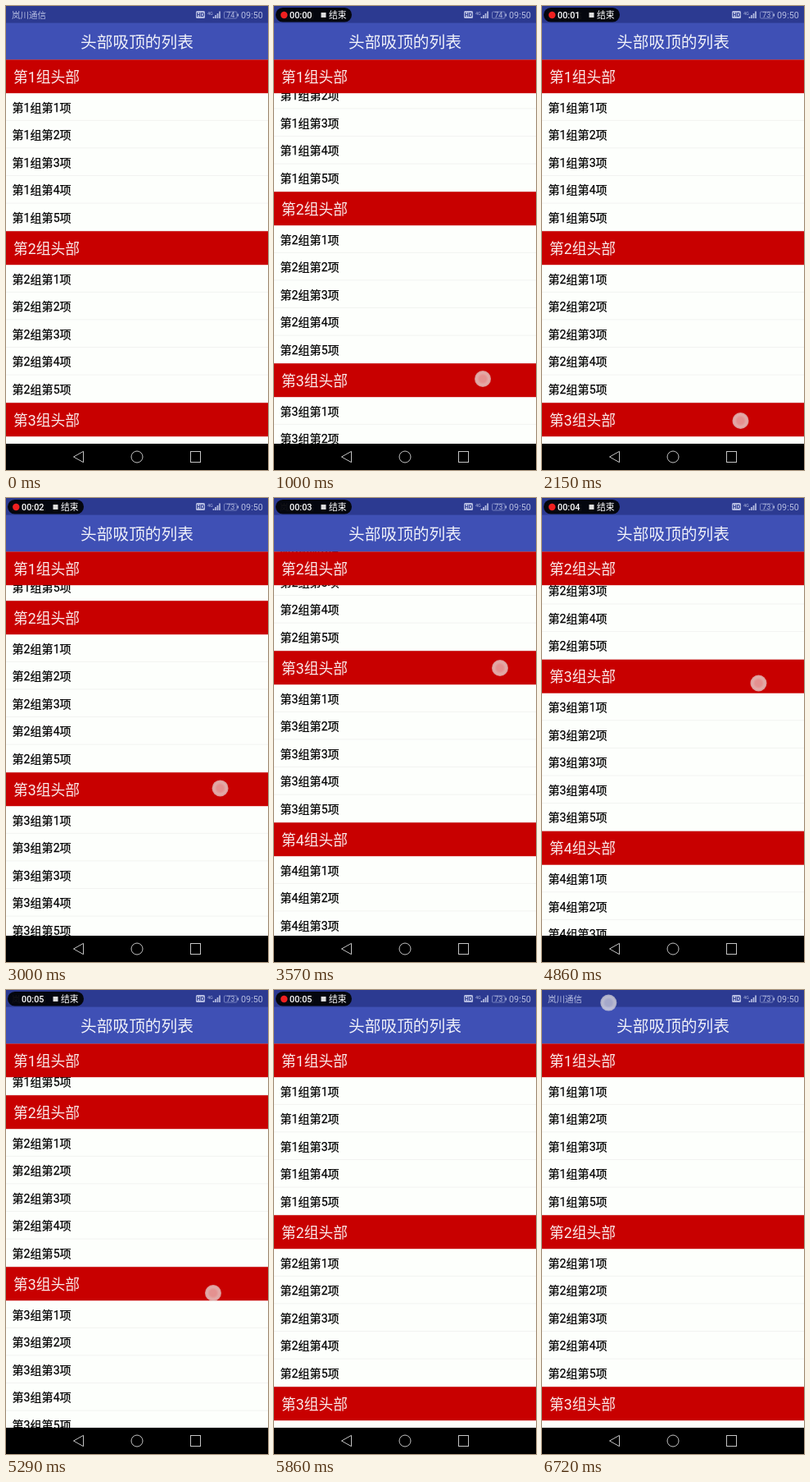
An HTML page for the animation above (6.87 s loop, 320 by 565 pixels).

```html
<!DOCTYPE html>
<html lang="zh-CN">
<head>
<meta charset="utf-8">
<style>
  html, body { margin: 0; height: 100%; overflow: hidden; background: #000; }
  svg { display: block; width: 100vw; height: 100vh; font-family: Roboto, "Noto Sans CJK SC", "Noto Sans CJK", sans-serif; }
  .status { fill: #b4bbe0; font-size: 10.5px; }
  .status .hd { fill: #2c3a91; font-size: 7px; font-weight: bold; }
  .status .net { font-size: 5.5px; }
  .status .charge { font-size: 9px; }
  .status .clock { font-size: 10.8px; }
  .head { fill: #fff; fill-opacity: .92; font-size: 17.8px; }
  .item { font-size: 14.1px; stroke: #000; stroke-width: .25px; }
</style>
</head>
<body>
<svg viewBox="0 0 320 565">
  <radialGradient id="glow">
    <stop offset=".4" stop-color="#f6f2f0" stop-opacity=".6"/>
    <stop offset=".75" stop-color="#ece9e6" stop-opacity=".74"/>
    <stop offset="1" stop-color="#e4e0de" stop-opacity=".66"/>
  </radialGradient>
  <rect width="320" height="565" fill="#fdfffc"/>
  <g id="items"></g>
  <g id="heads"></g>

  <rect y="20" width="320" height="45.2" fill="#3f50b5"/>
  <text x="160" y="51" text-anchor="middle" font-size="19.7" fill="#fff" fill-opacity=".92">头部吸顶的列表</text>

  <rect width="320" height="20.6" fill="#2c3a91"/>
  <g class="status">
    <text x="7" y="14.8">岚川通信</text>
    <rect x="232" y="6" width="11" height="9" rx="1.5"/>
    <text class="hd" x="237.5" y="13.1" text-anchor="middle">HD</text>
    <text class="net" x="246" y="11">4G</text>
    <path d="M253.5 15v-2M256 15v-4M258.5 15v-6M261 15v-8.5" stroke="#b4bbe0" stroke-width="1.7"/>
    <rect x="266.5" y="7" width="15.5" height="8" rx="1" fill="none" stroke="#7480c0"/>
    <rect x="282.5" y="9.5" width="1.5" height="3"/>
    <text id="battery" class="charge" x="274.3" y="14.3" text-anchor="middle"></text>
    <text class="clock" x="287" y="14.8">09:50</text>
  </g>
  <g id="recorder">
    <rect x="2" y="2" width="93" height="17.5" rx="8.7" opacity=".9"/>
    <circle id="dot" cx="12.3" cy="11" r="4.2" fill="#f02020"/>
    <text id="timer" x="19" y="14.8" font-size="10.8" font-weight="500" fill="#fff"></text>
    <rect x="57.5" y="8" width="6" height="6" fill="#ddd"/>
    <text x="67" y="14.8" font-size="10.8" fill="#fff">结束</text>
  </g>

  <rect y="533" width="320" height="32"/>
  <g fill="none" stroke="#c4c4c4">
    <path d="M82.5 549L94.5 542.3V555.7Z"/>
    <circle cx="160" cy="549" r="7"/>
    <rect x="225.5" y="542.5" width="12" height="13"/>
  </g>

  <circle id="finger" r="10" fill="url(#glow)"/>
</svg>
<script>
const LOOP = 6870, FPS = 7, TOP = 65.2, HEAD = 41, ROW = 33.6, GROUP = HEAD + 5 * ROW;
const $ = id => document.getElementById(id);

// [step, list scroll, finger x, finger y]
const keys = [
  [0, 0, 262, 511], [4, 0, 262, 511], [5, 12, 260, 490], [7, 48, 255, 454],
  [10, 84, 252, 420], [12, 62, 249, 444], [15, 0, 242.5, 505], [17, 14, 245, 489],
  [20, 112, 258, 390], [25, 297, 276, 207], [28, 428, 280, 76], [29, 438, 280, 69],
  [31, 427, 276, 82], [37, 146, 253, 369], [40, 0, 246, 511], [47, 0, 246, 511]
];

function pose(step) {
  const i = Math.max(1, keys.findIndex(k => k[0] >= step));
  const a = keys[i - 1], b = keys[i], u = (step - a[0]) / (b[0] - a[0]);
  return a.map((v, j) => v + (b[j] - v) * u).slice(1);
}

for (let g = 0; g < 6; g++) {
  for (let i = 0; i < 5; i++) {
    const y = TOP + g * GROUP + HEAD + i * ROW;
    $('items').innerHTML += `<text class="item" x="7.5" y="${y + 22.3}">第${g + 1}组第${i + 1}项</text>
      <path d="M0 ${y + ROW - .5}H320" stroke="#f2f3f1"/>`;
  }
  $('heads').innerHTML += `<g><rect width="320" height="${HEAD}" fill="#c80000"/>
    <text class="head" x="9" y="27.5">第${g + 1}组头部</text></g>`;
}
const heads = [...$('heads').children];

const move = (el, x, y) => el.setAttribute('transform', `translate(${x} ${y})`);
const show = (el, on) => el.setAttribute('visibility', on ? 'inherit' : 'hidden');

function draw(now) {
  const t = now % LOOP, step = Math.min(47, Math.floor((t + 2) * FPS / 1000));
  let [scroll, x, y] = pose(step);

  move($('items'), 0, -scroll);
  heads.forEach((head, g) => {
    const top = TOP + g * GROUP - scroll;
    move(head, 0, Math.min(Math.max(top, TOP), top + GROUP - HEAD));
  });

  if (step >= 46) [x, y] = [81.3, 15.6];
  move($('finger'), x, y);
  show($('finger'), step >= 4 && step <= 40 || step >= 46);

  const elapsed = Math.max(0, step * 1000 / FPS - 250);
  $('timer').textContent = '00:0' + Math.floor(elapsed / 1000);
  show($('dot'), elapsed % 1000 > 500);
  show($('recorder'), step >= 1 && step < 47);
  $('battery').textContent = step < 11 ? 74 : 73;
}

const start = performance.now();
function loop() {
  draw(performance.now() - start);
  requestAnimationFrame(loop);
}
loop();
</script>
</body>
</html>
```
